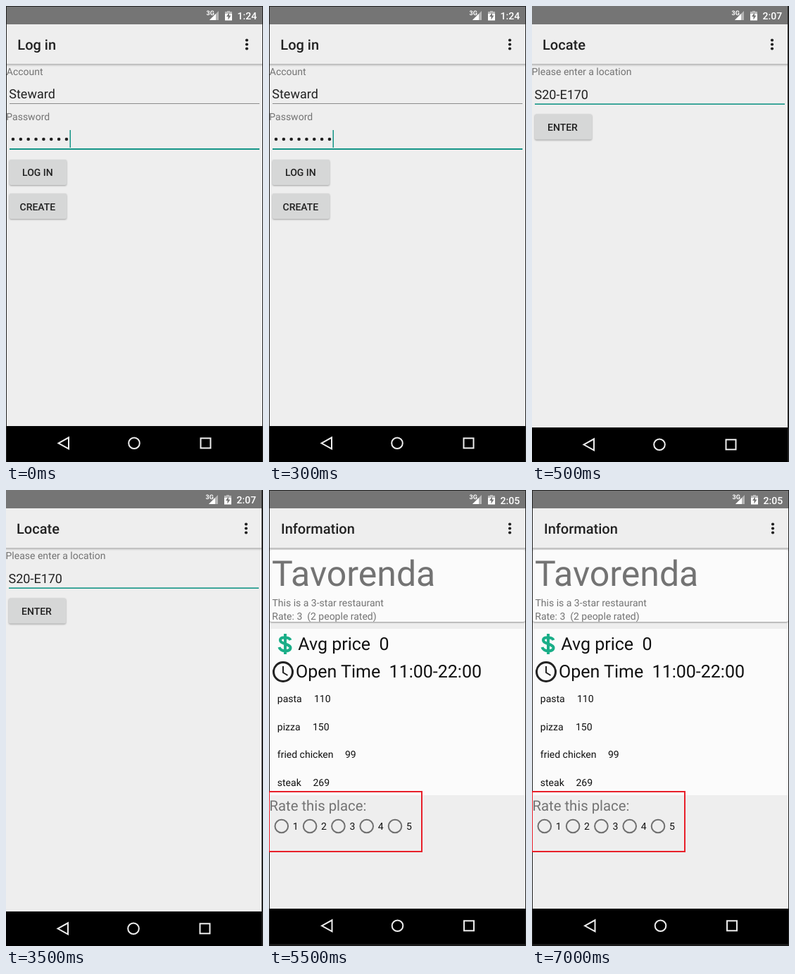
These frames come from a looping animation (365 by 647 pixels, 8 s). An HTML page:

```html
<!DOCTYPE html>
<html lang="en">
<head>
<meta charset="utf-8">
<title>Restaurant app</title>
<style>
  html, body { margin: 0; width: 100%; height: 100%; overflow: hidden; background: #eee; }
  svg { display: block; width: 365px; height: 647px; }
  text { font: 14px Roboto, sans-serif; fill: #737373; white-space: pre; text-rendering: geometricPrecision; }
  .title { font-size: 20px; font-weight: 500; fill: #212121; }
  .input { font-size: 18px; fill: #212121; }
  .button { font-weight: 500; fill: #212121; }
  .time { font-weight: 500; fill: #fff; }
  .network { font-size: 9px; font-weight: 700; fill: #fff; }
  .name { font-size: 50px; }
  .fact { font-size: 25px; fill: #111; }
  .rate { font-size: 20.3px; }
  .item { fill: #111; }
  .key { fill: #d6d7d7; filter: drop-shadow(0 1px 1px #0005); }
  .card { fill: #fbfbfb; }
  .raised { filter: drop-shadow(0 1px 1px #0006); }
  .line { fill: none; stroke-width: 2; }
  .scene { visibility: hidden; animation: 8s step-end infinite; }
  #login { animation-name: login; }
  #locate { animation-name: locate; }
  #info { animation-name: info; }
  @keyframes login { 0% { visibility: visible } 6.25%, 100% { visibility: hidden } }
  @keyframes locate { 0% { visibility: hidden } 6.25% { visibility: visible } 68.75%, 100% { visibility: hidden } }
  @keyframes info { 0% { visibility: hidden } 68.75%, 100% { visibility: visible } }
</style>
</head>
<body>
<svg viewBox="0 0 365 647">
  <defs>
    <linearGradient id="shade" x2="0" y2="1">
      <stop stop-color="#000" stop-opacity=".25"/>
      <stop offset="1" stop-color="#000" stop-opacity="0"/>
    </linearGradient>
    <g id="header">
      <rect x="-2" width="370" height="26" fill="#757575"/>
      <rect x="-2" y="82" width="370" height="4" fill="url(#shade)"/>
      <text x="284.5" y="13" class="network">3G</text>
      <path d="M289 20L302 7V20Z" fill="#b5b5b5"/>
      <path d="M289 20L298 11V20Z" fill="#fff"/>
      <path d="M311 8.5h3V7h4v1.5h3V20.5h-10Z" fill="#fff"/>
      <path d="M311 8.5h3V7h4v1.5h3V11h-10Z" fill="#bbb"/>
      <path d="M317 9.5L313 15h2.5v4.5L319.5 13.5H317Z" fill="#757575"/>
      <g fill="#212121">
        <circle cx="342" cy="48.5" r="2.1"/>
        <circle cx="342" cy="54.5" r="2.1"/>
        <circle cx="342" cy="60.5" r="2.1"/>
      </g>
    </g>
    <g id="nav">
      <rect x="-2" y="596" width="370" height="55"/>
      <g class="line" stroke="#eee">
        <path d="M74.5 620.3L89 612.3V628.3Z"/>
        <circle cx="182" cy="620.3" r="7.8"/>
        <rect x="276.5" y="613.3" width="14" height="14"/>
      </g>
    </g>
    <path id="frame" d="M0 .5H365M.5 0V647M364.5 0V647" stroke="#222"/>
  </defs>

  <g id="login" class="scene">
    <rect width="365" height="647" fill="#eee"/>
    <use href="#header"/>
    <text x="328.5" y="19" class="time">1:24</text>
    <text x="16.3" y="62" class="title">Log in</text>
    <text x="0.8" y="98">Account</text>
    <text x="4.3" y="131" class="input">Steward</text>
    <rect x="5" y="138" width="355" height="1" fill="#8c8c8c"/>
    <text x="0.3" y="162">Password</text>
    <path d="M10 189H87" stroke="#212121" stroke-width="4.6" stroke-linecap="round" stroke-dasharray="0 10.85"/>
    <rect x="90.5" y="176" width="1.5" height="25" fill="#159587"/>
    <rect x="5" y="202" width="355" height="2" fill="#159587"/>
    <rect x="5" y="218" width="81" height="36" rx="2" class="key"/>
    <text x="23" y="241" class="button">LOG IN</text>
    <rect x="5" y="266" width="81" height="36" rx="2" class="key"/>
    <text x="19.5" y="290" class="button">CREATE</text>
    <use href="#nav"/>
    <use href="#frame"/>
  </g>

  <g id="locate" class="scene">
    <rect width="365" height="647" fill="#eee"/>
    <use href="#header" x="-1"/>
    <text x="327.5" y="19" class="time">2:07</text>
    <text x="15" y="62" class="title">Locate</text>
    <text x="-0.5" y="98">Please enter a location</text>
    <text x="3.5" y="131.5" class="input">S20-E170</text>
    <rect x="4" y="138.4" width="355" height="1.6" fill="#159587"/>
    <rect x="4" y="153.5" width="81" height="36" rx="2" class="key"/>
    <text x="22" y="177" class="button">ENTER</text>
    <use href="#nav" x="-1" y="2"/>
    <path d="M364 0V647" stroke="#222" stroke-width="2"/>
  </g>

  <g id="info" class="scene">
    <rect width="365" height="647" fill="#eee"/>
    <use href="#header"/>
    <text x="328.5" y="19.5" class="time">2:05</text>
    <text x="17" y="62" class="title">Information</text>
    <rect x="1" y="85" width="363" height="102" rx="3" class="card raised"/>
    <text x="4" y="136" class="name">Tavorenda</text>
    <text x="4.5" y="165">This is a 3-star restaurant</text>
    <text x="4.3" y="184">Rate: 3  (2 people rated)</text>
    <rect x="1" y="197" width="363" height="236" class="card"/>
    <path d="M30.5 213C29 209 16 207 16 213S30.5 218 30.5 224S16 230 14.5 223M23 204V233" fill="none" stroke="#1aae88" stroke-width="4"/>
    <text x="41.3" y="227" class="fact">Avg price  0</text>
    <g fill="none" stroke="#222">
      <circle cx="20" cy="258" r="13.5" stroke-width="3"/>
      <path d="M20 250V259L26.5 263" stroke-width="2"/>
    </g>
    <text x="38" y="266.3" class="fact">Open Time  11:00-22:00</text>
    <g id="menu"></g>
    <text x="0.5" y="455" class="rate">Rate this place:</text>
    <g id="stars"></g>
    <use href="#nav" x="0.5" y="-2"/>
    <rect y="644" width="365" height="3" fill="#1a1a1a"/>
    <use href="#frame"/>
    <path d="M0 428H217V513H0" class="line" stroke="#e8202a"/>
    <path d="M.5 427V514" stroke="#e8202a"/>
  </g>
</svg>
<script>
  const label = (x, y, text) => `<text class="item" x="${x}" y="${y}">${text}</text>`;

  const dishes = [["pasta", 110, 64], ["pizza", 150, 62], ["fried chicken", 99, 108], ["steak", 269, 62.5]];
  document.getElementById("menu").innerHTML = dishes.map(([dish, price, x], i) => {
    const y = 301 + i * 39.6;
    return label(11.8, y, dish) + label(x, y, price);
  }).join("");

  document.getElementById("stars").innerHTML = [1, 2, 3, 4, 5].map(n => {
    const x = 17.8 + (n - 1) * 40.3;
    return `<circle class="line" stroke="#707070" cx="${x}" cy="477" r="9.3"/>` + label(x + 16, 482, n);
  }).join("");
</script>
</body>
</html>
```
